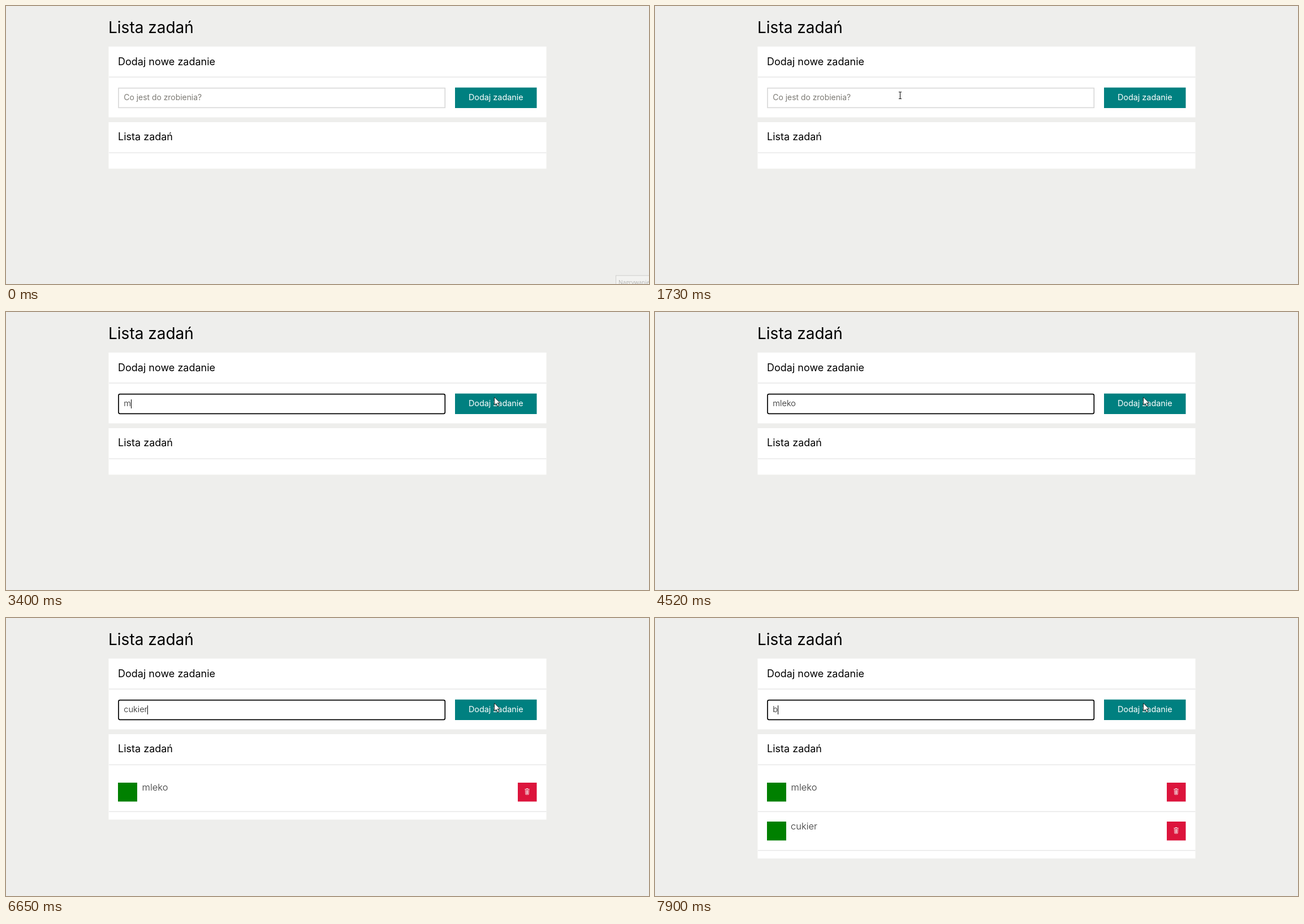
Recreate the animation shown at these times as an HTML page. Size 1137 by 493 pixels, loop 8000 ms.

```html
<!DOCTYPE html>
<html lang="pl">
<head>
<meta charset="utf-8">
<title>Lista zadań</title>
<style>
  html, body { margin: 0; width: 100%; height: 100%; overflow: hidden; background: #eeeeec; }
  svg { display: block; font-family: Inter, "Open Sans", sans-serif; }
  .panel { fill: #fff; }
  .rule { fill: #e9e9e9; }
  .title { font-size: 28px; font-weight: 400; }
  .head { font-size: 18px; font-weight: 400; }
  .field { font-size: 14.6px; font-weight: 300; fill: #222; }
  .hint { font-size: 13.9px; fill: #7c7a74; }
  .item { font-size: 16.5px; font-weight: 300; fill: #333; }
  .button { font-size: 14.4px; fill: #fff; text-anchor: middle; }
  .note { font: 10px "Open Sans", sans-serif; fill: #b4b4b2; }
</style>
</head>
<body>
<svg width="1137" height="493" viewBox="0 0 1137 493">
  <defs>
    <g id="row">
      <rect x="198" y="292" width="34" height="33.5" fill="green"/>
      <rect x="905" y="292" width="33.5" height="33.5" fill="crimson"/>
      <path d="M917.5 303.5h8M920 302.5h3M918.3 304l.6 9h5.2l.6-9M920.3 305v7M921.5 305v7M922.7 305v7"
            fill="none" stroke="#f4dfe2" stroke-width=".9"/>
      <rect class="rule" x="182" y="342.5" width="773.5" height="1.6"/>
    </g>
  </defs>

  <text class="title" x="181" y="48">Lista zadań</text>

  <rect class="panel" x="181.5" y="72" width="774" height="125.5"/>
  <text class="head" x="198" y="104.5">Dodaj nowe zadanie</text>
  <rect class="rule" x="182" y="125.2" width="773.5" height="1.6"/>
  <rect id="input" x="199" y="145.6" width="577.3" height="34.7" fill="#fff" stroke-width="1.7"/>
  <text id="hint" class="hint" x="208.3" y="167">Co jest do zrobienia?</text>
  <text id="typed" class="field" x="208.3" y="167"></text>
  <rect id="caret" y="155" width="1" height="16"/>
  <rect x="794" y="144.6" width="144.5" height="36.4" fill="teal"/>
  <rect id="ring" x="793" y="144" width="146.5" height="38" fill="none" stroke="#000" stroke-width="1.8"/>
  <text class="button" x="866.3" y="167">Dodaj zadanie</text>

  <rect id="list" class="panel" x="181.5" y="206" width="774" height="83"/>
  <text class="head" x="198" y="238">Lista zadań</text>
  <rect class="rule" x="182" y="259.5" width="773.5" height="1.6"/>
  <g id="milk"><use href="#row"/><text class="item" x="240.5" y="306">mleko</text></g>
  <g id="sugar" transform="translate(0 69)"><use href="#row"/><text class="item" x="240" y="306">cukier</text></g>

  <g id="note">
    <rect x="1078.5" y="478" width="70" height="30" fill="#f2f2f0" stroke="#d0d0ce"/>
    <text class="note" x="1083" y="493.5">Nagrywanie</text>
  </g>

  <g id="pointer">
    <path id="arrow" d="M0 0V14L3.3 11L5.6 16.2L8 15.1L5.7 10.2H10.2Z" fill="#fff" stroke="#111" stroke-width=".9"/>
    <path id="beam" d="M-2.5 -6H-.7L0 -5.4L.7 -6H2.5M0 -5.4V5.4M-2.5 6H-.7L0 5.4L.7 6H2.5"
          fill="none" stroke="#111" stroke-width="1.1"/>
  </g>
  <circle id="click" cx="863" cy="151" r="10.3" fill="rgba(240,225,0,.55)"/>
</svg>
<script>
const LOOP = 8000, FOCUS = 2410, PRESS = 2270, ADD_MILK = 5060, ADD_SUGAR = 7180;
const el = id => document.getElementById(id);
const show = (id, on) => el(id).setAttribute('visibility', on ? 'visible' : 'hidden');

// [time, field text, caret visible]
const typing = [
  [FOCUS, '', 1], [2940, '', 0],
  [3400, 'm', 1], [3530, 'ml', 1], [3670, 'mle', 1], [3790, 'mlek', 1], [3990, 'mleko', 1], [4520, 'mleko', 0],
  [ADD_MILK, '', 1], [5590, '', 0],
  [5850, 'c', 1], [5980, 'cu', 1], [6180, 'cuk', 1], [6380, 'cuki', 1], [6450, 'cukie', 1], [6650, 'cukier', 1],
  [ADD_SUGAR, '', 1], [7710, '', 0], [7900, 'b', 1]
];

const easeOut = u => 1 - (1 - u) ** 2;
const easeInOut = u => u * u * (3 - 2 * u);

// Pointer moves: start, end, number of steps, easing, curve points
const moves = [
  [70, 650, 10, easeOut, [1130, 490], [410, 12], [453, 145.5]],
  [790, 990, 4, easeOut, [453, 145.5], [443, 152], [433.5, 158.5]],
  [1790, 2200, 7, easeInOut, [433.5, 158.5], [650, 289], [863.5, 151]]
];

function pointerAt(t) {
  const move = moves.filter(m => t >= m[0]).pop();
  if (!move) return null;
  const [start, end, steps, ease, a, b, c] = move;
  const step = Math.floor((t - start) / (end - start) * (steps - 1) + 1e-6) + 1;
  const s = ease(Math.min(1, step / steps));
  return a.map((v, i) => (1 - s) ** 2 * v + 2 * s * (1 - s) * b[i] + s * s * c[i]);
}

function draw(t) {
  const [, text, caret] = typing.filter(k => t >= k[0]).pop() || [0, '', 0];
  const focused = t >= FOCUS;
  el('input').setAttribute('stroke', focused ? '#000' : '#d9d9d9');
  el('input').setAttribute('rx', focused ? 2.5 : 0);
  el('typed').textContent = text;
  show('hint', !text);
  show('caret', caret);
  el('caret').setAttribute('x', 208.3 + el('typed').getComputedTextLength());

  const pressed = t >= PRESS && t < FOCUS;
  show('ring', pressed);
  show('click', pressed);

  const rows = (t >= ADD_MILK) + (t >= ADD_SUGAR);
  show('milk', rows > 0);
  show('sugar', rows > 1);
  el('list').setAttribute('height', 82.5 + 69 * rows);

  el('note').setAttribute('opacity', t < 70 ? 1 : t < 130 ? .4 : 0);

  const p = pointerAt(t);
  show('pointer', p);
  if (p) {
    const [x, y] = p;
    const overInput = x > 198 && x < 777 && y > 145 && y < 181;
    el('pointer').setAttribute('transform', `translate(${x} ${y})`);
    el('arrow').setAttribute('display', overInput ? 'none' : 'inline');
    el('beam').setAttribute('display', overInput ? 'inline' : 'none');
  }
}

const origin = performance.now();
function tick() {
  draw((performance.now() - origin) % LOOP);
  requestAnimationFrame(tick);
}
tick();
</script>
</body>
</html>
```
